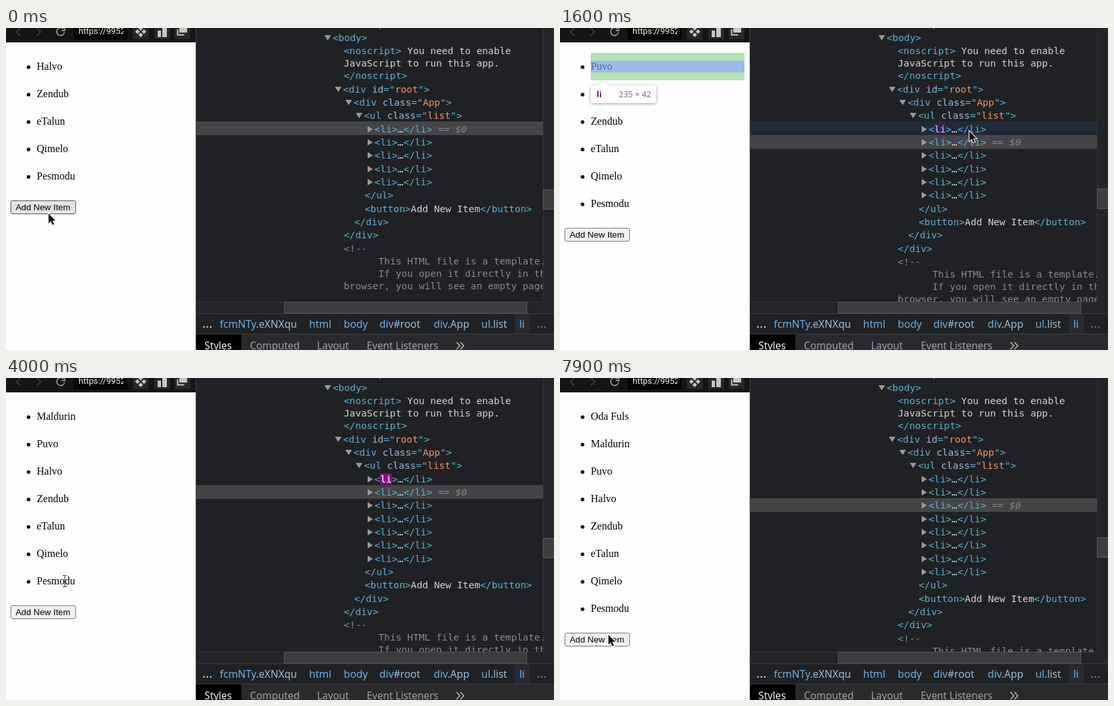
Recreate the animation shown at these times as an HTML page. Size 838 by 493 pixels, loop 8000 ms.

```html
<!DOCTYPE html>
<html lang="en">
<head>
<meta charset="utf-8">
<title>List inspector</title>
<style>
  html, body { margin: 0; width: 100%; height: 100%; overflow: hidden; }
  svg { display: block; width: 100%; height: 100%; }
  .code { font: 14.667px "DejaVu Sans Mono", monospace; fill: #5db0d7; }
  .attr { fill: #9bbbdc; }
  .val { fill: #f29766; }
  .plain { fill: #d5d5d5; }
  .note { fill: #898989; }
  .dollar { fill: #868686; font-style: italic; }
  .item { font: 16px "Liberation Serif", serif; }
  .btn { font: 13.333px "Liberation Sans", sans-serif; text-anchor: middle; }
  .ui { font: 15.7px "Noto Sans", sans-serif; fill: #6cafe6; }
  .tab { font: 15.4px "Noto Sans", sans-serif; fill: #a0a2a5; }
  .tip { font: 13px "Noto Sans", sans-serif; }
</style>
</head>
<body>
<svg viewBox="0 0 838 493">
  <defs>
    <clipPath id="url"><path d="M103 0h76.500v20h-76.500z"/></clipPath>
    <filter id="shade" x="-20%" y="-40%" width="140%" height="190%">
      <feDropShadow dx="0" dy="1" stdDeviation="2" flood-opacity=".4"/>
    </filter>
  </defs>
  <rect width="838" height="493" fill="#202124"/>
  <rect width="290" height="493" fill="#fefefe"/>
  <g id="live"></g>

  <!-- browser bar -->
  <rect width="290" height="22" fill="#161417"/>
  <g fill="none" stroke="#454347" stroke-width="1.500">
    <path d="M22 0l-6 6 6 6M47 0l6 6-6 6"/>
    <path d="M88 1.500a6 6 0 1 0 1.500 5M90 -1v5h-5" stroke="#aaa"/>
  </g>
  <path d="M103 0h83v15q0 3-3 3h-77q-3 0-3-3z" fill="#050506"/>
  <text x="111" y="9" clip-path="url(#url)" fill="#f2f2f2" style="font:13px Roboto,sans-serif">https://9952</text>
  <path d="M194 0h24v17h-24zM227 0h24v17h-24zM258 0h24v17h-24z" fill="#29272b"/>
  <g fill="#c6c6c6">
    <path d="M206 -3l3.500 3.500-3.500 3.500-3.500-3.500zM201 2l3.500 3.500-3.500 3.500-3.500-3.500zM211 2l3.500 3.500-3.500 3.500-3.500-3.500zM206 7l3.500 3.500-3.500 3.500-3.500-3.500z"/>
    <path d="M232 4h5v10h-5zM239 0h7v14h-7zM265 0h12v7h-12z"/>
    <path d="M262.500 2v8.500h10" fill="none" stroke="#c6c6c6" stroke-width="2"/>
  </g>
  <path d="M290.500 0v493" stroke="#46474a"/>

  <!-- inspector frame -->
  <path d="M821 0h17v437h-547v-18h530z" fill="#252428"/>
  <path d="M291 419.500h530M821.500 0v419" stroke="#343438"/>
  <rect x="425.500" y="419.500" width="371" height="17" fill="#3c3c3e" stroke="#545456"/>
  <rect id="thumb" x="821.500" width="17" height="30" fill="#3e3e40" stroke="#59595b"/>
  <rect x="291" y="437" width="547" height="32" fill="#202124"/>
  <rect x="778" y="437" width="23" height="31" fill="#2a2b31"/>
  <rect x="291" y="469" width="547" height="24" fill="#292a2d"/>
  <rect x="291" y="469" width="69" height="24" fill="#000"/>
  <path d="M291 437.500h547M291 468.500h547" stroke="#3d3e41"/>
  <g class="ui">
    <text x="300" y="459" style="font-size:20px" fill="#c9c9c9">…</text>
    <text x="327" y="459">fcmNTy<tspan class="attr">.eXNXqu</tspan></text>
    <text x="463.500" y="459">html</text>
    <text x="516.500" y="459">body</text>
    <text x="571" y="459">div<tspan class="attr">#root</tspan></text>
    <text x="654" y="459">div<tspan class="attr">.App</tspan></text>
    <text x="727" y="459">ul<tspan class="attr">.list</tspan></text>
    <text x="785" y="459">li</text>
    <text x="811" y="459" style="font-size:20px" fill="#717274">…</text>
  </g>
  <g class="tab">
    <text x="303.500" y="492" fill="#f4f4f4">Styles</text>
    <text x="373" y="492">Computed</text>
    <text x="475.500" y="492">Layout</text>
    <text x="551.500" y="492">Event Listeners</text>
    <path d="M689 481l5 5.500-5 5.500M695 481l5 5.500-5 5.500" fill="none" stroke="#b8b8b8" stroke-width="1.600"/>
  </g>
  <g id="cursor">
    <path id="arrow" d="M0 0V15L3.500 12 6 17.500 8.500 16.500 6 11H10.500Z" fill="#151515" stroke="#fff" stroke-width="2" paint-order="stroke"/>
    <path id="beam" d="M-3 -8.500h2.500l.5.500.5-.5h2.500M0 -8v16M-3 8.500h2.500l.5-.5.5.5h2.500" fill="none" stroke="#222"/>
  </g>
</svg>
<script>
const $ = id => document.getElementById(id);
const NAMES = ["Oda Fuls", "Maldurin", "Puvo", "Halvo", "Zendub", "eTalun", "Qimelo", "Pesmodu"];
const LOOP = 8000, PITCH = 20.333, FADE = 1400;
const ADDED = [900, 3800, 6500], TREE_LAG = 200;
const PICKED = 2200, BLURRED = 3700;

// time, x, y
const PATH = [
  [0, 65, 283], [900, 65, 283], [1000, 78, 283], [1100, 112, 277], [1300, 320, 214],
  [1500, 590, 159], [1600, 626, 157], [1800, 628, 157], [2200, 600, 156], [2500, 592, 160],
  [2600, 586, 168], [2800, 300, 255], [3000, 82, 326], [3100, 72, 329], [3200, 72, 329],
  [3300, 70, 325], [3700, 70, 325], [3800, 90, 310], [4800, 90, 310], [5300, 76, 346],
  [6000, 76, 346], [6200, 75, 353], [7300, 75, 353], [7900, 74, 392]
];

const within = (t, a, b) => t >= a && t < b;

function cursorAt(t) {
  const i = PATH.findIndex(p => p[0] > t);
  if (i < 0) return PATH[PATH.length - 1].slice(1);
  const [t0, x0, y0] = PATH[i - 1], [t1, x1, y1] = PATH[i];
  const k = (t - t0) / (t1 - t0);
  return [x0 + (x1 - x0) * k, y0 + (y1 - y0) * k];
}

const rect = (x, y, w, h, fill, more = "") =>
  `<rect x="${x}" y="${y}" width="${w}" height="${h}" fill="${fill}" ${more}/>`;
const text = (x, y, cls, s, more = "") => `<text x="${x}" y="${y}" class="${cls}" ${more}>${s}</text>`;

// ~...~ marks plain text inside markup
function paint(s) {
  return s.replace(/</g, "&lt;")
    .replace(/(\w+)="(\w+)"/g, '<tspan class="attr">$1</tspan>="<tspan class="val">$2</tspan>"')
    .replace(/~(.+?)~/g, '<tspan class="plain">$1</tspan>');
}
const code = (x, y, s, cls = "") => text(x, Math.round(y), "code " + cls, paint(s));
const open = (x, y) => `<path d="M${x - 12.500} ${Math.round(y) - 9}h10l-5 8z" fill="#9a9b9d"/>`;
const shut = (x, y) => `<path d="M${x - 10.500} ${Math.round(y) - 10}v10l8-5z" fill="#9a9b9d"/>`;

function page(t, count) {
  let out = "";
  NAMES.slice(-count).forEach((name, i) => {
    out += `<circle cx="34.500" cy="${60 + 42 * i}" r="2.800"/>` + text(47, 64 + 42 * i, "item", name);
  });
  const y = 264 + 42 * (count - 5);
  const hover = t < 900 || within(t, 3300, 3800) || within(t, 6100, 6500);
  out += rect(7.5, y + .5, 99, 20, hover ? "#e4e4e4" : "#efefef", `rx="2.500" stroke="${hover ? "#4f4f4f" : "#767676"}"`);
  return out + text(56.5, y + 15, "btn", "Add New Item");
}

function overlay() {
  const green = "#90d68a", see = 'opacity=".66"';
  return rect(47, 38, 235, 12, green, see) + rect(47, 50, 235, 18, "#6f9bdc", see) + rect(47, 68, 235, 12, green, see) +
    '<path d="M50 88h8l8-7 8 7h70q3 0 3 3v21q0 3-3 3h-94q-3 0-3-3v-21q0-3 3-3z" fill="#fff" filter="url(#shade)"/>' +
    text(56, 106, "tip", "li", 'fill="#881280" font-weight="700" style="font-weight:700"') +
    text(90, 106, "tip", "235 × 42", 'fill="#737373" style="font-size:12.500px"');
}

function tree(t, count, selected, hover, flash) {
  const top = 143.5, base = 159.7;
  const line = n => base + PITCH * n;
  let out = "";
  if (hover) out += rect(291, 143, 530, 21, "#202a39");
  const focused = within(t, PICKED, BLURRED);
  out += rect(291, Math.round(top + PITCH * selected - .2), 530, 21, focused ? "#10316a" : "#454547");

  out += code(499.5, 0, "<head>~…~</head>");
  out += open(499.5, 20) + code(499.5, 20, "<body>");
  out += code(516.5, 40, "<noscript>~ You need to enable~") +
    code(516.5, 59, "~JavaScript to run this app.~") + code(516.5, 78, "</noscript>");
  ['<div id="root">', '<div class="App">', '<ul class="list">'].forEach((s, i) => {
    const x = 515.5 + 16 * i, y = line(i - 3);
    out += open(x, y) + code(x, y, s);
  });

  for (let i = 0; i < count; i++) {
    out += shut(563.5, line(i)) + code(563.5, line(i), "<li>~…~</li>");
    if (i === selected) out += code(660.7, line(i), "== $0", "dollar");
  }
  if (flash > .01) {
    out += rect(572, 146, 18, 17, "#8d0a86", `rx="1" opacity="${flash}"`) +
      text(572.3, 160, "code", "li") + text(572.3, 160, "code", "li", `style="fill:#fff" opacity="${flash}"`);
  }

  out += code(548.5, line(count), "</ul>") +
    code(548.5, line(count + 1), "<button>~Add New Item~</button>") +
    code(532.5, line(count + 2), "</div>") + code(516.5, line(count + 3), "</div>");
  const y = Math.round(line(count + 4));
  [[0, "<!--"], [53, "This HTML file is a template."], [53, "If you open it directly in the"],
    [0, "browser, you will see an empty page."]].forEach(([dx, s], i) => {
    out += code(516.5 + dx, y + 19 * i, s, "note");
  });
  return out;
}

function draw(t) {
  const items = 5 + ADDED.filter(a => t >= a).length;
  const updates = ADDED.map(a => a + TREE_LAG).filter(a => t >= a);
  const nodes = 5 + updates.length;
  const selected = t < PICKED ? updates.length : updates.length - 1;
  const last = updates[updates.length - 1];
  const flash = updates.length ? Math.max(0, 1 - (t - last) / FADE) ** 2.5 : 0;
  const hover = within(t, 1500, 2700);

  $("live").innerHTML = page(t, items) + (hover ? overlay() : "") + tree(t, nodes, selected, hover, flash);
  $("thumb").setAttribute("y", 252.5 - nodes);

  const [x, y] = cursorAt(t), beam = within(t, 3800, 5100) || within(t, 6500, 7500);
  $("cursor").setAttribute("transform", `translate(${x} ${y + 1})`);
  $("arrow").style.display = beam ? "none" : "";
  $("beam").style.display = beam ? "" : "none";
}

let shown = -1;
function tick() {
  const t = Math.floor(performance.now() % LOOP / 100) * 100;
  if (t !== shown) draw(shown = t);
  requestAnimationFrame(tick);
}
tick();
</script>
</body>
</html>
```
